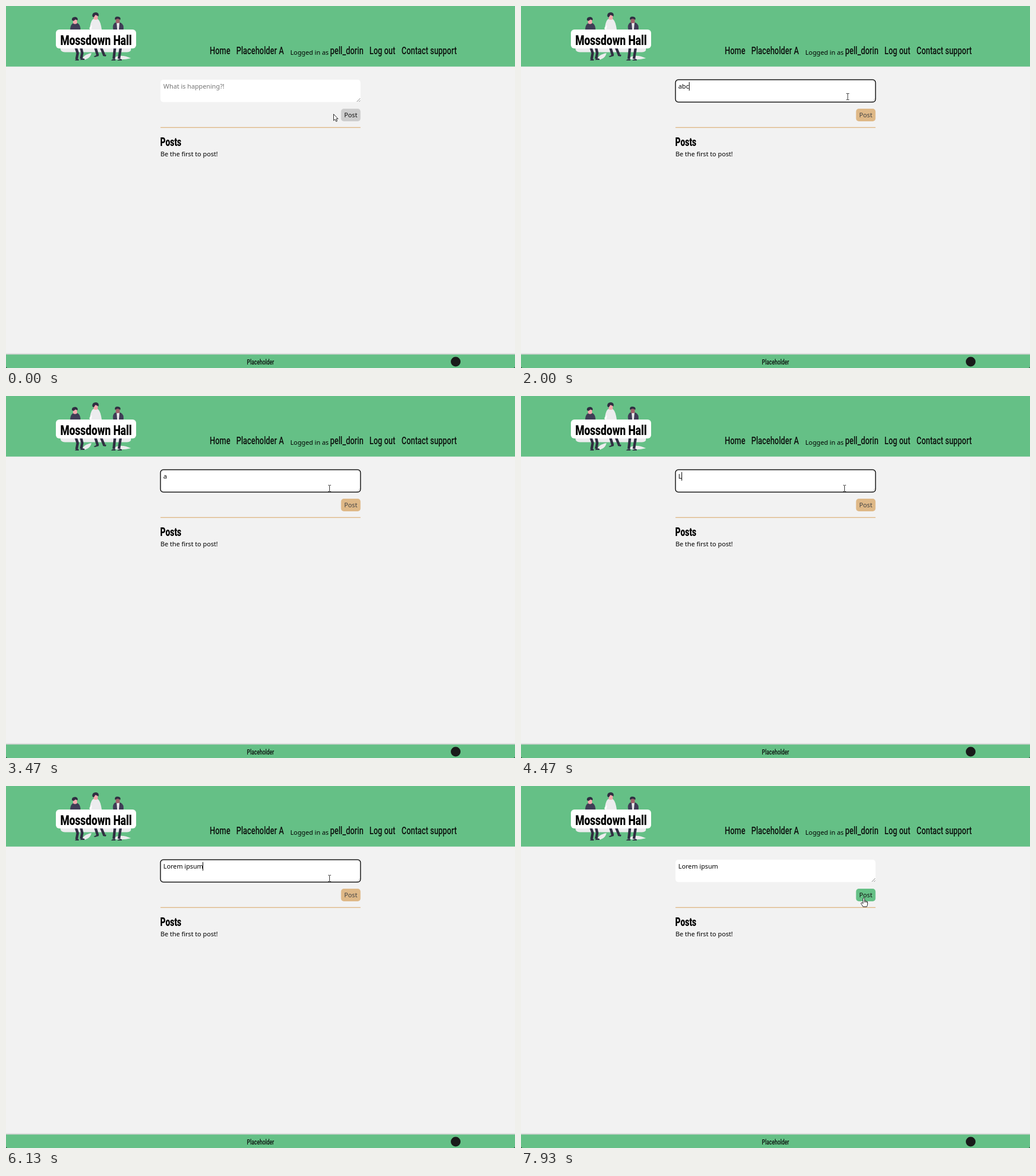
These frames come from a looping animation (888 by 631 pixels, 8000 ms). An HTML page:

```html
<!DOCTYPE html>
<html lang="en">
<head>
<meta charset="utf-8">
<title>Posting a message</title>
<style>
  html, body { margin: 0; width: 100%; height: 100%; overflow: hidden; background: #f2f2f2; }
  svg { display: block; }
  text { font: 11.2px "Noto Sans", sans-serif; fill: #000; white-space: pre; }
  .narrow text { font-family: Roboto, sans-serif; font-size: 18px; font-weight: 500; fill: #0c0f0d; }
  .narrow .title { font-size: 24.4px; font-weight: 800; fill: #000; text-anchor: middle; }
  .narrow .heading { font-size: 19.4px; font-weight: 800; fill: #000; }
  .narrow .foot { font-size: 12px; text-anchor: middle; }
  .green { fill: #65c086; }
  .dark { fill: #2f2e41; }
  .pale { fill: #ececee; }
  .skin { fill: #f3a9ad; }
  .limb { fill: none; stroke: #2f2e41; stroke-width: 4.5; stroke-linejoin: round; }
  #placeholder { fill: #757575; }
  #cursors > * { display: none; stroke-linejoin: round; }
</style>
</head>
<body>
<svg width="888" height="631" viewBox="0 0 888 631">
  <defs>
    <linearGradient id="shade" x2="0" y2="1">
      <stop offset="0" stop-color="#000" stop-opacity="0"/>
      <stop offset="1" stop-color="#000" stop-opacity=".2"/>
    </linearGradient>
  </defs>
  <rect width="888" height="631" fill="#f2f2f2"/>
  <rect class="green" width="888" height="105.600"/>

  <g id="people">
    <path class="pale" d="M95 74H218Q219 80 211 80.500H103Q95 80 95 74ZM133 94Q134 85 149 82Q147 93 133 94ZM186 92Q198 82 218 91Q203 95 186 92Z"/>
    <path class="limb" d="M122 73L125 82L123 93M131 73L133 82L131 92M156 73L160 86M166 73L171 85M190 73L188 92M200 73L197 92"/>
    <path class="dark" d="M120 95q3-4 7-2v2zM129 94q3-4 8-2v2zM153 88l8-4 1 3-7 2zM169 84l6 1-1 3-5-1zM183 95q4-4 8-2v2zM194 95q4-4 8-2v2z"/>
    <path d="M112 41Q112 33 117 30H125Q130 33 130 41ZM187 41Q185 33 190 29H200Q206 32 205 41Z" fill="#3f3d56"/>
    <path class="pale" d="M146 41Q147 28 151 23.500Q156 21 161 23.500Q165 27 167 41ZM193 29H198L197 41H194Z"/>
    <path d="M145 39L150 33L149 41Z" fill="#fff"/>
    <path class="skin" d="M117 23h7v7q-3.500 3-7 0zM153 15h7v8q-3.500 2-7 0z"/>
    <path d="M191.500 22h7v7q-3.500 2-7 0z" fill="#9f616a"/>
    <path class="dark" d="M115 25Q114 19 121 19Q126 20 125 25L121 23.500L118 26ZM150.500 18Q150 11 157 11Q163 12 161.500 18L156 15.500L153 20ZM190 24Q189 18 195 18.500Q201 19 199.500 24L195 22Z"/>
  </g>
  <rect x="87" y="41" width="140" height="33" rx="6" fill="#fff"/>
  <text x="496" y="84.500">Logged in as</text>

  <rect id="field" x="269.500" y="128.500" width="349" height="39" rx="5" fill="#fff"/>
  <path id="grip" d="M612 167L618 161M615.500 167L618 164.500" stroke="#666" stroke-width=".8"/>
  <text id="placeholder" x="274.600" y="144">What is happening?!</text>
  <text id="typed" x="274.600" y="144"></text>
  <rect id="caret" y="132.500" width="1" height="15"/>

  <rect id="button" x="584.500" y="179" width="34" height="22" rx="5"/>
  <text id="post" x="590" y="194">Post</text>
  <rect x="269.500" y="211" width="349" height="1.400" fill="#deb887"/>
  <text x="269.500" y="261.500">Be the first to post!</text>

  <rect y="605" width="888" height="2.500" fill="url(#shade)"/>
  <rect class="green" y="607.500" width="888" height="23.500"/>
  <circle cx="784.500" cy="620" r="8.500" fill="#191b1a"/>
  <path d="M0 628Q0 631 3 631H0ZM888 628Q888 631 885 631H888Z" fill="#222"/>

  <!-- labels in one shared narrow face -->
  <g class="narrow" id="labels"></g>

  <g id="cursors">
    <path id="arrow" d="M.5 .5V11.700L3.100 9.400L4.900 13.300L6.800 12.500L5.100 8.700H8.300Z" fill="#fff" stroke="#111" stroke-width=".9"/>
    <path id="beam" d="M-2.500 -5.500H-.8L0 -5L.8 -5.500H2.500M0 -5V5M-2.500 5.500H-.8L0 5L.8 5.500H2.500" fill="none" stroke="#333" stroke-width="1"/>
    <path id="hand" d="M-1.300 8V1.200Q-1.300 0 0 0T1.300 1.200V5.200Q2.700 4.500 3.300 5.700Q4.600 5.200 5.200 6.400Q6.700 6.300 6.600 8V11Q6.400 13 5.200 15.500H-1.300Q-2.500 13 -4.600 10.300Q-5.200 8.800 -4 8.400Q-2.700 8.200 -1.300 10ZM1.300 5.200V8M3.300 5.700V8M5.200 6.400V8.300" fill="#fff" stroke="#111" stroke-width=".9"/>
  </g>
</svg>

<script>
const LOOP = 8000;
const NARROW = 0.74;
const BLINK = 532;
const $ = id => document.getElementById(id);

// [x, baseline, text, class]
const labels = [
  [157, 67.5, "Mossdown Hall", "title"],
  [355.5, 84.3, "Home"],
  [401.7, 84.3, "Placeholder A"],
  [565.5, 84.3, "pell_dorin"],
  [634, 84.3, "Log out"],
  [690, 84.3, "Contact support"],
  [269, 244, "Posts", "heading"],
  [444, 624.7, "Placeholder", "foot"]
];
for (const [x, y, words, kind] of labels) {
  const node = document.createElementNS("http://www.w3.org/2000/svg", "text");
  node.textContent = words;
  if (kind) node.setAttribute("class", kind);
  node.setAttribute("transform", `translate(${x} ${y}) scale(${NARROW} 1)`);
  $("labels").append(node);
}

// [time, shape, x, y]
const pointer = [
  [0, "arrow", 571, 188], [130, "arrow", 573, 189], [200, "arrow", 576, 189],
  [400, "arrow", 575, 188], [530, "arrow", 574, 188], [730, "arrow", 573, 184],
  [800, "arrow", 571, 174], [870, "beam", 567, 160], [930, "beam", 564, 153],
  [1000, "beam", 563, 151], [2000, "beam", 570, 158], [2070, "arrow", 581, 170],
  [2130, "hand", 590, 185], [2200, "hand", 595, 193], [2670, "hand", 595, 189],
  [2730, "hand", 593, 183], [2800, "arrow", 591, 176], [2870, "beam", 577, 164],
  [2930, "beam", 568, 162], [3000, "beam", 564.5, 161], [7400, "beam", 566, 162],
  [7470, "arrow", 571, 168], [7530, "arrow", 577, 174], [7600, "arrow", 583, 180],
  [7670, "hand", 589, 186], [7730, "hand", 593, 190], [7800, "hand", 596, 193],
  [7870, "hand", 598, 195]
];

// [time, text]
const typing = [
  [0, ""], [1200, "a"], [1400, "ab"], [1870, "abc"], [3270, "ab"], [3400, "a"], [3800, ""],
  [4470, "L"], [4600, "Lo"], [4800, "Lor"], [4870, "Lore"], [4930, "Lorem"],
  [5330, "Lorem "], [5600, "Lorem i"], [5730, "Lorem ip"], [5870, "Lorem ips"],
  [5930, "Lorem ipsu"], [6130, "Lorem ipsum"]
];

// moments at which the caret starts a fresh blink
const wakes = [1000, 1200, 1400, 1870, 2932, 4470, 4600, 4800, 4870, 4930,
  5330, 5600, 5730, 5870, 5930, 6130].map(t => [t]);

const at = (steps, t) => steps.findLast(step => step[0] <= t);
const set = (id, attrs) => {
  for (const name in attrs) $(id).setAttribute(name, attrs[name]);
};
const show = (id, on) => $(id).style.display = on ? "inline" : "none";

function draw(t) {
  const focused = t >= 1000 && t < 7930;
  const hovered = (t >= 2130 && t < 2870) || t >= 7670;
  const words = at(typing, t)[1];
  const [, shape, x, y] = at(pointer, t);

  set("field", { stroke: focused ? "#111" : "none", "stroke-width": 1.5 });
  set("grip", { opacity: focused ? 0.45 : 1 });
  set("button", { fill: !words ? "#cdcdcd" : hovered ? "#65c086" : "#deb887" });
  $("post").style.fill = focused ? "#444" : "#111";
  show("placeholder", !words);
  if ($("typed").textContent !== words) $("typed").textContent = words;

  const wake = at(wakes, t);
  const lit = focused && wake && Math.floor((t - wake[0]) / BLINK) % 2 === 0;
  const atStart = !words || (t >= 3070 && t < 4470);
  const end = atStart ? 0 : $("typed").getComputedTextLength();
  show("caret", lit);
  set("caret", { x: Math.floor(274.6 + end + (atStart ? 0.5 : 0)) });

  for (const id of ["arrow", "beam", "hand"]) show(id, id === shape);
  set(shape, { transform: `translate(${x} ${y})` });
}

const start = performance.now();
function tick() {
  draw((performance.now() - start) % LOOP);
  requestAnimationFrame(tick);
}
tick();
</script>
</body>
</html>
```
